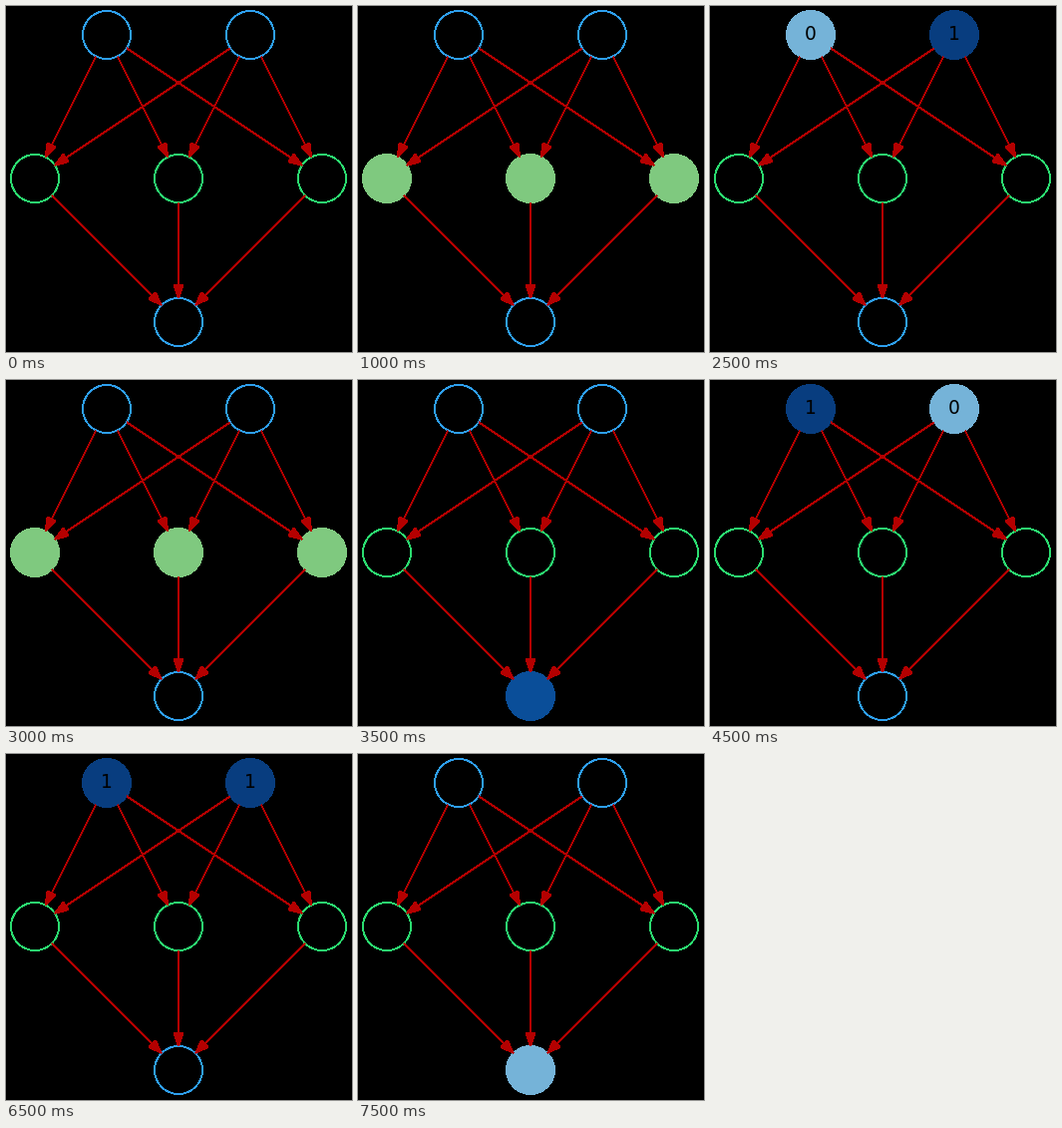
An HTML page that plays this animation: 347 px wide and 347 px high, repeating every 8 s.

```html
<!DOCTYPE html>
<html lang="en">
<head>
<meta charset="utf-8">
<title>Neural network</title>
<style>
  html, body { margin: 0; width: 100%; height: 100%; overflow: hidden; background: #000; }
  svg { display: block; position: absolute; left: 0; top: 0; }
  circle, path { stroke-width: 1.5; shape-rendering: crispEdges; }
  text { font: 14px "DejaVu Sans", sans-serif; text-anchor: middle; fill: #000; }
  .edge { stroke: #b40000; fill: #b40000; stroke-linejoin: bevel; }
</style>
</head>
<body>
<svg id="net" width="348" height="348" viewBox="0.25 0.25 261 261"></svg>
<script>
const SVG = "http://www.w3.org/2000/svg";
const net = document.getElementById("net");
const BLUE = "#2e9fee", GREEN = "#2bdc70";
const LOW = "#75b3d8", HIGH = "#083d7f", WARM = "#0a4e99", ACTIVE = "#7fc97f";
const R = 18, STEP = 500;

function add(tag, attrs) {
  const el = document.createElementNS(SVG, tag);
  for (const key in attrs) el.setAttribute(key, attrs[key]);
  return net.appendChild(el);
}

function makeNode(x, y, color) {
  const circle = add("circle", { cx: x, cy: y, r: R });
  const label = add("text", { x, y: y + 3.7 });
  return { x, y, color, circle, label };
}

function paint(node, fill, text = "") {
  node.circle.setAttribute("fill", fill || "none");
  node.circle.setAttribute("stroke", fill || node.color);
  node.label.textContent = text;
}

// Straight arrow from border to border with a 10 by 7 head
function connect(a, b) {
  const len = Math.hypot(b.x - a.x, b.y - a.y);
  const ux = (b.x - a.x) / len, uy = (b.y - a.y) / len;
  const at = (d, side = 0) => `${a.x + ux * d - uy * side} ${a.y + uy * d + ux * side}`;
  const tip = len - R, base = tip - 10;
  add("path", {
    class: "edge",
    d: `M${at(R)}L${at(base)}M${at(base, 3.5)}L${at(tip)}L${at(base, -3.5)}Z`
  });
}

const inputs = [76, 184].map(x => makeNode(x, 22, BLUE));
const hidden = [22, 130, 238].map(x => makeNode(x, 130, GREEN));
const output = makeNode(130, 238, BLUE);

for (const h of hidden) {
  for (const i of inputs) connect(i, h);
  connect(h, output);
}

const cases = [
  { bits: [0, 0], out: LOW },
  { bits: [0, 1], out: WARM },
  { bits: [1, 0], out: LOW },
  { bits: [1, 1], out: LOW }
];

// Each case runs through rest, inputs, hidden layer, output
function show(step) {
  const { bits, out } = cases[Math.floor(step / 4)];
  const phase = step % 4;
  inputs.forEach((n, i) =>
    phase === 1 ? paint(n, bits[i] ? HIGH : LOW, String(bits[i])) : paint(n));
  hidden.forEach(n => paint(n, phase === 2 && ACTIVE));
  paint(output, phase === 3 && out);
}

const start = performance.now();
let shown = -1;
function tick(now) {
  const step = Math.floor(Math.max(0, now - start) / STEP) % (cases.length * 4);
  if (step !== shown) show(shown = step);
  requestAnimationFrame(tick);
}
tick(start);
</script>
</body>
</html>
```
